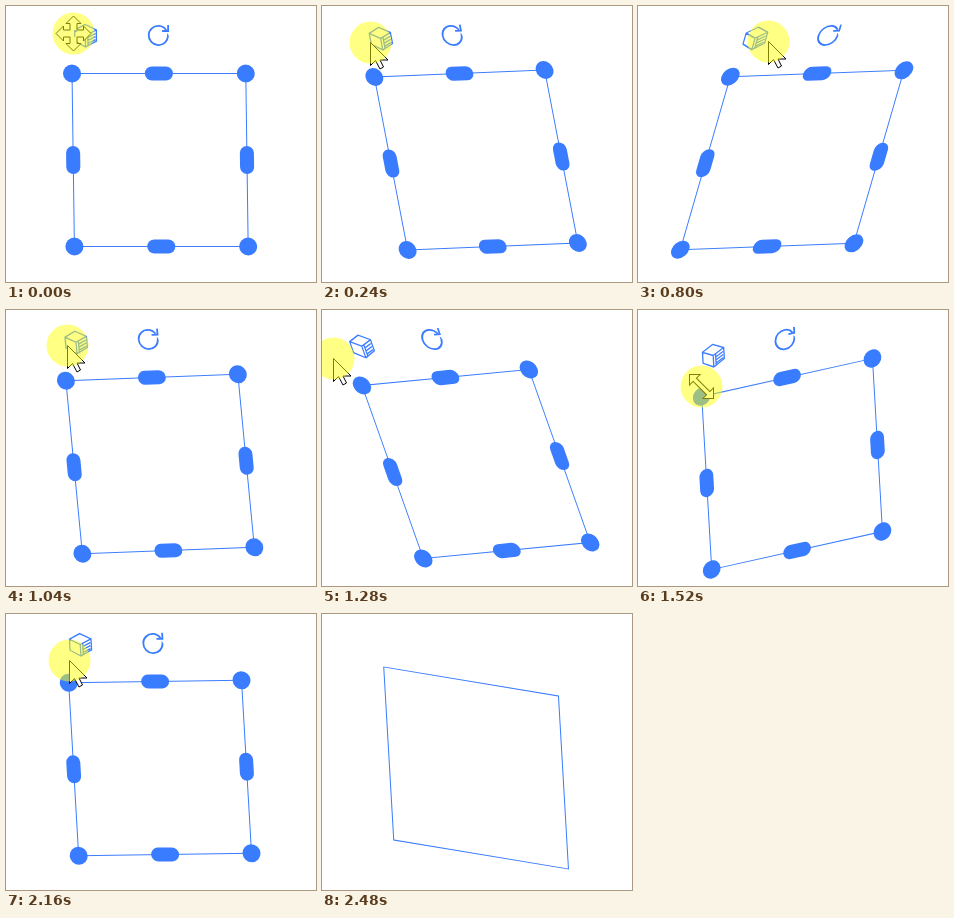
These frames come from a looping animation (310 px wide and 276 px high, 2550 ms). An HTML page with a canvas:

```html
<!DOCTYPE html>
<html lang="en">
<head>
<meta charset="utf-8">
<title>Skewing a selection box</title>
<style>
  html, body { margin: 0; height: 100%; overflow: hidden; background: #fff; }
  canvas { display: block; }
</style>
</head>
<body>
<canvas id="stage" width="310" height="276"></canvas>
<script>
const ctx = document.getElementById('stage').getContext('2d');
const LOOP = 2550, STEP = 80, HALF = 86.5, BLUE = '#3a7cff';
const CORNER_DRAG = 1520, HANDLES_END = 2320, POINTER_END = 2480;

// Turning points of the two drags, as [time, value]
const skewPath = [[0, 1.2], [160, 27], [400, -16.5], [640, -40], [800, -25], [1260, 30.4], [1520, 5]];
const tiltPath = [[0, 0], [240, -3.5], [1120, -3.5], [1280, -8], [1520, -19], [1780, -48], [1920, -40.3], [2330, 14.5]];
const pointerPath = [[0, 67], [160, 21], [400, 127], [640, 176], [800, 130], [1280, 11], [1520, 63]];

// Smooth curve through the points, at rest at both ends
function follow(path, t) {
  const i = path.findIndex(point => point[0] > t);
  if (i < 0) return path[path.length - 1][1];
  const slope = n => {
    const before = path[n - 1], after = path[n + 1];
    return before && after ? (after[1] - before[1]) / (after[0] - before[0]) : 0;
  };
  const [t0, v0] = path[i - 1], [t1, v1] = path[i];
  const span = t1 - t0, p = (t - t0) / span, q = 1 - p;
  return v0 * q * q * (1 + 2 * p) + v1 * p * p * (1 + 2 * q)
    + span * p * q * (slope(i - 1) * q - slope(i) * p);
}

const arrow = new Path2D('M0 0V23L5 18L9.5 26.5L13 24.5L9.5 17.5H17.5Z');
const resize = new Path2D('M-17 0L-9.5 -7.5V-2.3H9.5V-7.5L17 0L9.5 7.5V2.3H-9.5V7.5Z');
const moveArm = new Path2D('M-3.5 -3.5V-10H-7.5L0 -17.5L7.5 -10H3.5V-3.5');
const move = new Path2D();
for (let turns = 0; turns < 4; turns++) {
  move.addPath(moveArm, new DOMMatrix().rotate(90 * turns));
}
const cube = new Path2D('M0 -11L11 -5.5V5.5L0 11.5L-10.5 5.5V-5.5ZM-10.5 -5.5L0 0L11 -5.5M0 0V11.5M2.5 -1V10');
for (let y = 2; y < 10; y += 3) {
  cube.moveTo(2.5, y);
  cube.lineTo(10, y - 3.8);
}
const turn = new Path2D('M9.8 -10.5V-4.5H3.8');
turn.moveTo(9.6, 0.5);
turn.arc(0, 0, 9.6, 0.05, -0.6);

function handle(x, y, w, h) {
  ctx.beginPath();
  ctx.roundRect(x - w / 2, y - h / 2, w, h, Math.min(w, h) / 2);
  ctx.fill();
}

function icon(x, width, path) {
  ctx.save();
  ctx.translate(x, -124.5);
  ctx.lineWidth = width;
  ctx.stroke(path);
  ctx.restore();
}

function drawBox(skew, tilt, withHandles) {
  const halfWidth = 87 + 0.06 * tilt - 0.1 * Math.max(0, skew);
  ctx.save();
  ctx.transform(halfWidth / HALF, tilt / HALF, skew / HALF, 1, 154.1, 154);
  ctx.strokeStyle = ctx.fillStyle = BLUE;
  ctx.lineWidth = 1;
  ctx.strokeRect(-HALF, -HALF, 2 * HALF, 2 * HALF);
  if (withHandles) {
    for (const side of [-HALF, HALF]) {
      handle(side, -HALF, 18, 18);
      handle(side, HALF, 18, 18);
      handle(0, side, 28, 14);
      handle(side, 0, 14, 28);
    }
    icon(-72.7, 1.3, cube);
    icon(0, 1.8, turn);
  }
  ctx.restore();
}

function drawPointer(x, y, t) {
  const resizing = t >= CORNER_DRAG && t < CORNER_DRAG + STEP;
  const shape = t < STEP ? move : resizing ? resize : arrow;
  ctx.save();
  ctx.translate(Math.round(x) + 0.5, Math.round(y) + 0.5);
  ctx.save();
  if (resizing) ctx.rotate(Math.PI / 4);
  ctx.fillStyle = '#fff';
  ctx.strokeStyle = '#000';
  ctx.fill(shape);
  ctx.stroke(shape);
  ctx.restore();
  ctx.beginPath();
  ctx.arc(0, 0, 21, 0, 2 * Math.PI);
  ctx.fillStyle = 'rgba(255, 255, 10, 0.5)';
  ctx.fill();
  ctx.restore();
}

function draw(now) {
  const t = Math.floor(now % LOOP / STEP) * STEP;
  const tilt = follow(tiltPath, t);
  const pointerY = t < CORNER_DRAG ? 27 - 2.57 * tilt : 44 - 1.69 * tilt;
  ctx.clearRect(0, 0, 310, 276);
  drawBox(follow(skewPath, t), tilt, t < HANDLES_END);
  if (t < POINTER_END) drawPointer(follow(pointerPath, t), pointerY, t);
}

const start = performance.now();
function tick() {
  draw(performance.now() - start);
  requestAnimationFrame(tick);
}
tick();
</script>
</body>
</html>
```
